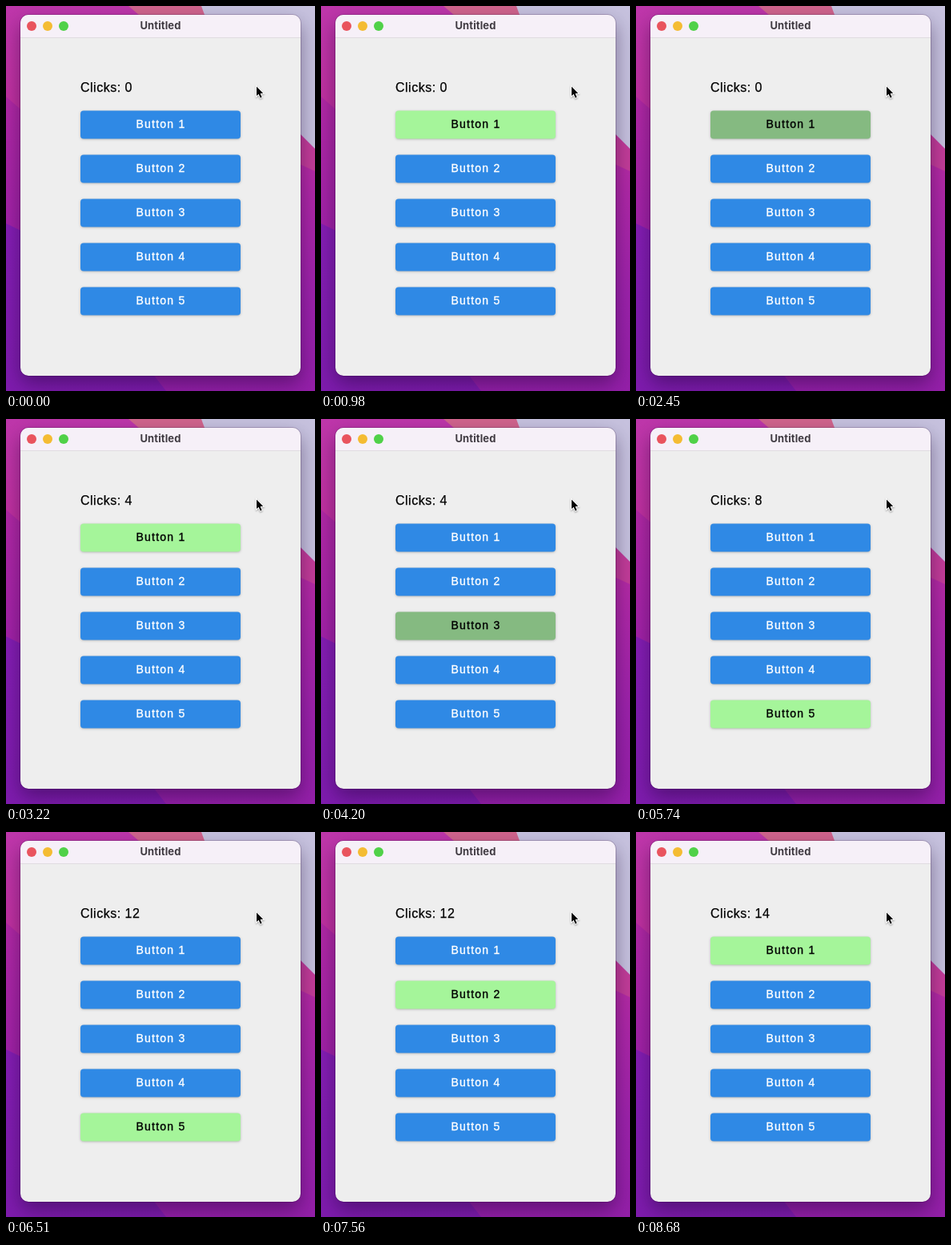
Recreate the animation shown at these times as an HTML page with a canvas. Size 386 by 480 pixels, loop 8820 ms.

```html
<!DOCTYPE html>
<html lang="en">
<head>
<meta charset="utf-8">
<title>Untitled</title>
<style>
  html, body { margin: 0; width: 100%; height: 100%; overflow: hidden; }
  canvas { display: block; width: 386px; height: 480px; }
</style>
</head>
<body>
<canvas id="stage" width="386" height="480"></canvas>
<script>
const LOOP = 8820;
const BUTTONS = 5;
const BEAT = 210;
const SANS = '"Liberation Sans", Arial, sans-serif';
const ctx = document.getElementById('stage').getContext('2d');

// How many of n evenly spaced key presses have happened by time t.
const hits = (t, start, n, gap = BEAT) =>
  Math.max(0, Math.min(n, Math.floor((t - start) / gap) + 1));

// Bursts of four or two clicks, each key held down for a while.
const BURSTS = [
  { start: 2450, n: 4, hold: 140 },
  { start: 4200, n: 4, hold: 70 },
  { start: 5810, n: 4, hold: 70 },
  { start: 8260, n: 2, hold: 140 }
];

function stateAt(t) {
  const tabs = hits(t, 980, BUTTONS + 1, 196) + hits(t, 3570, 2) + hits(t, 5180, 2);
  const steps = tabs - hits(t, 7140, BUTTONS - 1);
  let downs = 0, clicks = 0;
  for (const { start, n, hold } of BURSTS) {
    downs += hits(t, start, n);
    clicks += hits(t, start + hold, n);
  }
  return { focus: steps ? (steps - 1) % BUTTONS : -1, pressed: downs > clicks, clicks };
}

function shadow(color, blur, dy) {
  ctx.shadowColor = color;
  ctx.shadowBlur = blur;
  ctx.shadowOffsetY = dy;
}

function box(x, y, w, h, r, color) {
  ctx.beginPath();
  ctx.roundRect(x, y, w, h, r);
  ctx.fillStyle = color;
  ctx.fill();
}

function trace(points) {
  ctx.beginPath();
  points.forEach(([x, y]) => ctx.lineTo(x, y));
  ctx.closePath();
}

function poly(points, color) {
  trace(points);
  ctx.fillStyle = color;
  ctx.fill();
}

function fade(y0, y1, ...colors) {
  const g = ctx.createLinearGradient(0, y0, 0, y1);
  colors.forEach((c, i) => g.addColorStop(i / (colors.length - 1), c));
  return g;
}

// A thin outline gives the letters their slightly heavier weight.
function text(str, x, y, font, color, { spacing = 0, align = 'left', weight = 0 } = {}) {
  ctx.font = font;
  ctx.letterSpacing = spacing + 'px';
  ctx.textAlign = align;
  ctx.fillStyle = ctx.strokeStyle = color;
  ctx.fillText(str, x, y);
  if (weight) {
    ctx.lineWidth = weight;
    ctx.strokeText(str, x, y);
  }
}

function drawDesktop() {
  ctx.fillStyle = fade(0, 480, '#bd36aa', '#bf309f', '#ad27a6', '#9c22aa', '#931fa8');
  ctx.fillRect(0, 0, 386, 480);
  poly([[0, 113], [60, 165], [60, 300], [0, 271]], fade(113, 280, '#b028a4', '#a021a6'));
  poly([[0, 271], [60, 300], [200, 480], [0, 480]], fade(271, 480, '#831db2', '#7d1bac'));
  poly([[153, 0], [250, 0], [270, 40], [200, 40]], '#d0648c');
  poly([[330, 122], [386, 178], [386, 206], [330, 180]], '#c23c98');
  poly([[244, 0], [386, 0], [386, 178], [330, 122], [255, 30]], '#c6c2de');
}

function drawWindow() {
  ctx.save();
  shadow('rgba(20,0,40,.42)', 24, 10);
  box(18, 11, 350, 450, 10, '#eeeeee');
  ctx.restore();
  box(18, 11, 350, 28, [10, 10, 0, 0], '#f6f0f8');
  ctx.fillStyle = '#e0dce1';
  ctx.fillRect(18, 39, 350, 1);
  ctx.beginPath();
  ctx.roundRect(17.5, 10.5, 351, 451, 10.5);
  ctx.lineWidth = 1;
  ctx.strokeStyle = 'rgba(40,0,50,.2)';
  ctx.stroke();
  ['#e9545e', '#f4bc33', '#50d148'].forEach((color, i) => {
    box(26 + i * 20, 19, 12, 12, 6, color);
  });
  text('Untitled', 193, 29, 'bold 13px Inter, sans-serif', '#403b42',
    { spacing: 0.12, align: 'center' });
}

function drawButton(i, focused, pressed) {
  const y = 130.5 + i * 55;
  const color = !focused ? '#2f89e5' : pressed ? '#85ba81' : '#a5f59a';
  ctx.save();
  shadow('rgba(0,0,0,.25)', 3, 0.8);
  box(93, y, 200, 35, 4, color);
  ctx.restore();
  text('Button ' + (i + 1), 162.4, y + 21.5, '14px ' + SANS, focused ? '#000' : '#fff',
    { spacing: 1.25, weight: 0.35 });
}

function drawPointer() {
  ctx.save();
  ctx.translate(313, 100.5);
  trace([[0, 0], [0, 11.6], [2.6, 9.2], [4.7, 14], [6.6, 13.2], [4.6, 8.5], [8.2, 8.3]]);
  shadow('rgba(0,0,0,.35)', 2, 1);
  ctx.lineWidth = 2;
  ctx.strokeStyle = '#fff';
  ctx.stroke();
  shadow('transparent', 0, 0);
  ctx.fillStyle = '#000';
  ctx.fill();
  ctx.restore();
}

function draw(t) {
  const { focus, pressed, clicks } = stateAt(t);
  drawDesktop();
  drawWindow();
  text('Clicks: ' + clicks, 93, 107, '16px ' + SANS, '#000', { spacing: 0.5, weight: 0.25 });
  for (let i = 0; i < BUTTONS; i++) drawButton(i, i === focus, pressed);
  drawPointer();
}

const start = performance.now();
function frame() {
  draw((performance.now() - start) % LOOP);
  requestAnimationFrame(frame);
}
frame();
</script>
</body>
</html>
```
